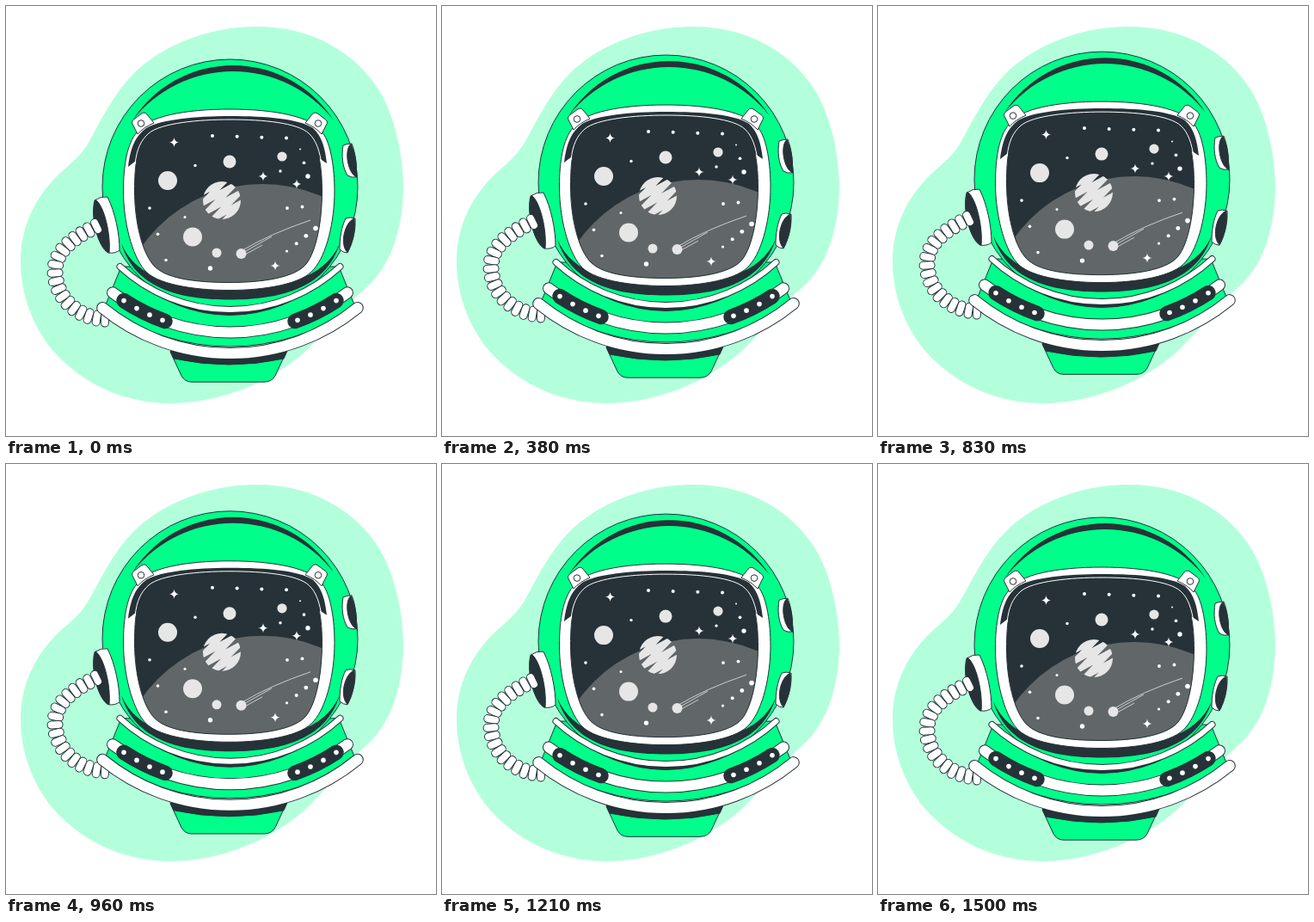
Animation of 500x500 px, one loop 1540 ms. Source, as an HTML page with a canvas:

```html
<!DOCTYPE html>
<html lang="en">
<head>
<meta charset="utf-8">
<title>Floating helmet</title>
<style>
html, body { margin: 0; width: 100%; height: 100%; overflow: hidden; background: #fff; }
canvas { display: block; width: 500px; height: 500px; }
</style>
</head>
<body>
<canvas id="stage" width="500" height="500"></canvas>
<script>
const ctx = document.getElementById('stage').getContext('2d');
const INK = '#263238', GREEN = '#00ff8a', MINT = '#b3ffdc', WHITE = '#fff';
const PALE = '#e6e6e6', GREY = '#616769';
const LOOP = 1540, CYCLE = 1500, STEPS = 36, LIFT = 10, CX = 260.5;

const hoseLine = document.createElementNS('http://www.w3.org/2000/svg', 'path');
hoseLine.setAttribute('d', 'M105 256 C72 272 57 288 57 308 C57 338 82 363 115 364');

function paint(path, fill, line, width = 1) {
  if (fill) { ctx.fillStyle = fill; ctx.fill(path); }
  if (line) { ctx.strokeStyle = line; ctx.lineWidth = width; ctx.stroke(path); }
}

function shape(d, fill, line = INK, width = 1) {
  paint(new Path2D(d), fill, line, width);
}

function disc(x, y, r, fill, line) {
  const path = new Path2D();
  path.arc(x, y, r, 0, 2 * Math.PI);
  paint(path, fill, line);
}

// Collar pieces hang on circles that are lowest at (CX, low)
const sag = (dx, low, r) => low - r + Math.sqrt(r * r - dx * dx);

function collarArc(from, to, low, r, width, color) {
  ctx.beginPath();
  ctx.arc(CX, low - r, r, Math.acos(from / r), Math.acos(to / r), true);
  ctx.lineCap = 'round';
  ctx.lineWidth = width;
  ctx.strokeStyle = color;
  ctx.stroke();
  ctx.lineCap = 'butt';
}

function tube(half, low, r, width) {
  collarArc(-half, half, low, r, width + 1, INK);
  collarArc(-half, half, low, r, width - 1, WHITE);
}

function mirrored(draw) {
  draw();
  ctx.save();
  ctx.translate(520, 0);
  ctx.scale(-1, 1);
  draw();
  ctx.restore();
}

function hose() {
  const count = 18, length = hoseLine.getTotalLength();
  for (let i = 0; i < count; i++) {
    const s = length * i / (count - 1);
    const p = hoseLine.getPointAtLength(s);
    const a = hoseLine.getPointAtLength(s - 1), b = hoseLine.getPointAtLength(s + 1);
    const bead = new Path2D();
    bead.roundRect(-4.5, -9, 9, 18, 4.5);
    ctx.save();
    ctx.translate(p.x, p.y);
    ctx.rotate(Math.atan2(b.y - a.y, b.x - a.x));
    paint(bead, WHITE, INK);
    ctx.restore();
  }
}

function sparkle(x, y, r = 5.5) {
  const path = new Path2D();
  path.moveTo(x, y - r);
  for (let i = 1; i <= 4; i++) {
    const a = i * Math.PI / 2, m = a - Math.PI / 4;
    path.quadraticCurveTo(x + Math.sin(m) * .8, y - Math.cos(m) * .8,
      x + Math.sin(a) * r, y - Math.cos(a) * r);
  }
  paint(path, WHITE);
}

// Evenly spaced stars from one point to another
function starChain(x1, y1, x2, y2, count, r1, r2 = r1) {
  for (let i = 0; i < count; i++) {
    const u = i / (count - 1);
    disc(x1 + (x2 - x1) * u, y1 + (y2 - y1) * u, r1 + (r2 - r1) * u, WHITE);
  }
}

function stripedPlanet() {
  ctx.save();
  ctx.translate(251, 226);
  ctx.beginPath();
  ctx.arc(0, 0, 22, 0, 2 * Math.PI);
  ctx.clip();
  ctx.rotate(-.65);
  ctx.beginPath();
  for (let k = 0; k <= 8; k++) ctx.lineTo(k % 2 ? 18 : -18, (k - 4) * 5.5);
  ctx.strokeStyle = PALE;
  ctx.lineWidth = 7;
  ctx.stroke();
  ctx.restore();
}

function sky() {
  const screen = new Path2D('M149.5 215 C149.5 185 152 161 166 148 C180 136 225 132 260 132' +
    ' C300 132 339 136 352 148 C364 161 367.5 190 367.5 215 C367.5 250 361 285 349 300' +
    ' C336 316 298 321.5 260 321.5 C216 321.5 186 316 173 303 C158 288 149.5 250 149.5 215Z');
  ctx.save();
  ctx.clip(screen);
  paint(screen, INK);
  disc(298, 379, 172, GREY);
  ctx.restore();
  paint(screen, null, INK);
  shape('M150 184 C152 166 157 156 166 148 C180 136 225 132 260 132' +
    ' C300 132 339 136 352 148 C361 156 365 170 367 184', null, WHITE);

  starChain(240, 151, 326, 153.5, 4, 2);
  starChain(342, 166.5, 351, 198, 3, 1, 2.7);
  starChain(220, 185.5, 319, 192, 2, 1.7);
  starChain(327, 235, 344.5, 233.5, 2, 1.9);
  starChain(326.5, 285, 360, 258.5, 4, 1.6, 2.8);
  starChain(167, 235, 186, 295.5, 3, 1.8);
  starChain(208, 245.5, 237.5, 305, 2, 1.5, 2.7);

  disc(188, 203, 11, PALE);
  disc(217, 268.5, 11, PALE);
  disc(260, 181, 7.5, PALE);
  disc(321, 175, 5.6, PALE);
  disc(245, 287, 5.5, PALE);
  disc(273.5, 288, 6, PALE);
  stripedPlanet();
  sparkle(195.5, 158.5);
  sparkle(299, 198);
  sparkle(338, 207);
  sparkle(313, 302);
  shape('M275 284 Q307 265 354 249 M277 286 L309 268 M278 289 L298 278', null, PALE, .8);
}

function pads() {
  shape('M103 226 Q110 221 118 222 C127 240 132 265 132 284 Q127 288 119 287 C108 282 98 245 103 226Z', WHITE);
  shape('M104 225 C114 232 122 265 120 287 C108 283 97 246 104 225Z', INK);
  shape('M392 162 Q397 160 402 160 C407 172 408 188 407.5 199 Q402 200 397 197 C391 187 390 174 392 162Z', WHITE);
  shape('M401 160.5 C407 172 408 188 407.5 199 C397 194 393 167 401 160.5Z', INK);
  shape('M395 247 Q400 245 406 247 C407 262 402 278 397 287 Q392 287 388 283 C388 270 390 257 395 247Z', WHITE);
  shape('M405 247 C407 262 402 278 397 286.5 C388 278 393 252 405 247Z', INK);
}

function collar() {
  const low = 379.5, r = 225;
  shape('M138 312 Q260 398 383 312 Q260 408 138 312Z', INK, null);
  tube(128, 353, 188.8, 7);
  tube(136.5, low, r, 13);
  collarArc(-123.5, -75.5, low, r, 17.5, INK);
  collarArc(75.5, 123.5, low, r, 17.5, INK);
  for (let i = 0; i < 4; i++) {
    const dx = 78.5 + 15 * i, y = sag(dx, low, r);
    disc(CX - dx, y, 2.8, WHITE);
    disc(CX + dx, y, 2.8, WHITE);
  }
  tube(148.3, 404, 234, 13);
}

function visor() {
  shape('M136.5 215 C136.5 185 141 160 152 147 C163 128 210 120 260 120 C310 120 356 128 368 147' +
    ' C378 160 382 190 382 215 C382 250 373 289 358 306 C345 323 302 330.5 260 330.5' +
    ' C216 330.5 174 323 161 307 C146 289 136.5 250 136.5 215Z', WHITE);
  shape('M142 187 C145 164 150 152 163 142 C180 132 220 128 260 128 C304 128 340 131 357 142' +
    ' C368 152 371 166 373 183 L361 175 L155 177Z', INK, null);
  sky();
  mirrored(() => {
    shape('M147.5 138 Q145 134.5 149 131.5 L157 125.5 Q161 122.5 164 126' +
      ' L172 136 Q160 141 153 149Z', WHITE);
    disc(157, 136.5, 3.8, WHITE, INK);
  });
}

function helmet() {
  shape('M191 402 L204 430 Q208 437.2 216 437.2 H300 Q309 437.2 313 430 L326 402Z', GREEN);
  shape('M191 401 L195 410 Q260 424 323 410 L327 401Z', INK);
  shape('M134 303 L114 352 Q260 440 407 352 L387 303Z', GREEN);
  disc(CX, 210.5, 148.5, GREEN, INK);
  shape('M147 133 A139 139 0 0 1 381 133 A148.6 148.6 0 0 0 147 133Z', INK, null);
  shape('M134 276 C150 330 205 341.5 260 341.5 C315 341.5 372 330 388 276' +
    ' C370 318 320 328 260 328 C200 328 152 318 134 276Z', INK, null);
  pads();
  hose();
  collar();
  visor();
}

function draw(time) {
  let step = STEPS;
  while (Math.round(step * CYCLE / STEPS / 10) * 10 > time) step--;
  const lift = LIFT * (1 - Math.abs(2 * step / STEPS - 1));

  ctx.fillStyle = WHITE;
  ctx.fillRect(0, 0, 500, 500);
  shape('M287 24 C355 22 408 55 435 100 C455 135 462 180 462 212 C461 262 447 303 418 328' +
    ' C395 348 378 372 352 398 C310 437 250 462 190 462 C130 461 85 435 54 400' +
    ' C31 372 17 335 17 297 C17 255 35 222 60 197 C78 181 88 173 97 157' +
    ' C110 134 125 102 148 79 C180 47 232 25 287 24Z', MINT, null);
  ctx.save();
  ctx.translate(0, -lift);
  helmet();
  ctx.restore();
}

const start = performance.now();
function tick() {
  draw((performance.now() - start) % LOOP);
  requestAnimationFrame(tick);
}
tick();
</script>
</body>
</html>
```
